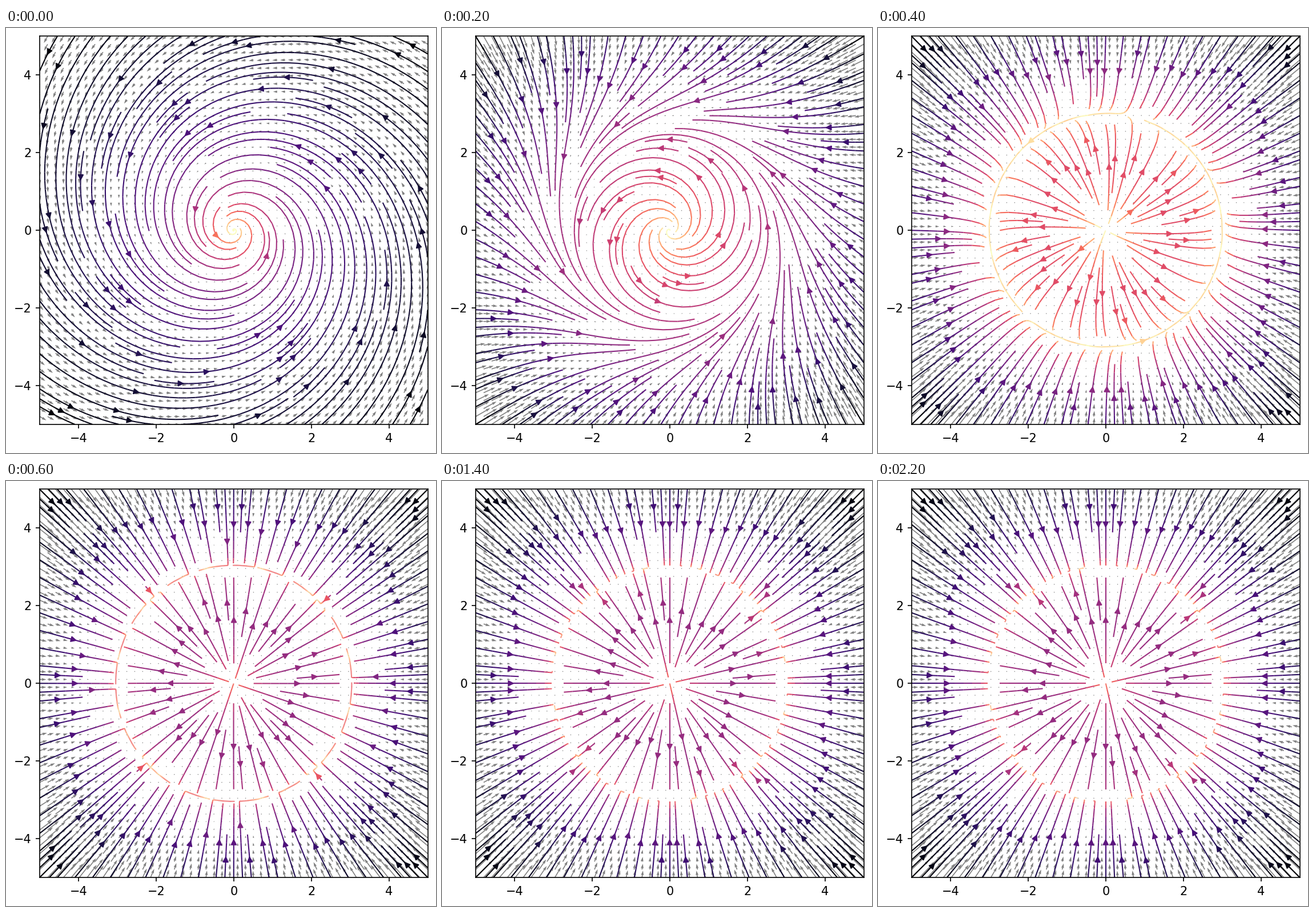
A matplotlib script that plays this animation: 753x744 px, repeating every 2400 ms.

```python
import math

import matplotlib.pyplot as plt
import numpy as np
from matplotlib.animation import FuncAnimation
from matplotlib.collections import LineCollection
from matplotlib.colors import Normalize
from matplotlib.patches import FancyArrowPatch

WIDTH, HEIGHT, DPI = 753, 744, 150
FRAMES, INTERVAL = 24, 100
EXTENT = 5.0
GRID = 50            # field samples per axis
CELLS = 45           # streamline spacing mask per axis
LAST = GRID - 1
TO_MASK = (CELLS - 1) / LAST
MAX_STEP, MAX_ERROR = 1 / CELLS, 0.003
MIN_LENGTH, MAX_LENGTH = 0.1, 2.0
CMAP = plt.get_cmap("magma_r")

axis = np.linspace(-EXTENT, EXTENT, GRID)
X, Y = np.meshgrid(axis, axis)


def field(frame):
    """Inward spiral that relaxes geometrically to a radial limit circle."""
    spiral = 0.2 ** frame
    radial = (1 - spiral) * 0.004 * (9.22 - X**2 - Y**2) - 0.3 * spiral
    return radial * X - spiral * Y, radial * Y + spiral * X


def spiral_cells():
    """Mask cells from the border inwards, counter-clockwise."""
    x0, y0, x1, y1 = 0, 1, CELLS - 1, CELLS - 1
    x = y = 0
    heading = "right"
    for _ in range(CELLS * CELLS):
        yield x, y
        if heading == "right":
            x += 1
            if x >= x1:
                x1 -= 1
                heading = "up"
        elif heading == "up":
            y += 1
            if y >= y1:
                y1 -= 1
                heading = "left"
        elif heading == "left":
            x -= 1
            if x <= x0:
                x0 += 1
                heading = "down"
        else:
            y -= 1
            if y <= y0:
                y0 += 1
                heading = "right"


def make_flow(u, v):
    """Bilinear unit-speed flow in grid coordinates; None outside the grid."""
    speed = np.hypot(u, v)
    us, vs, ss = u.tolist(), v.tolist(), speed.tolist()

    def mix(rows, i, j, a, b):
        low, high = rows[j], rows[j + 1]
        bottom = low[i] + (low[i + 1] - low[i]) * a
        top = high[i] + (high[i + 1] - high[i]) * a
        return bottom + (top - bottom) * b

    def flow(x, y):
        if not (0 <= x <= LAST and 0 <= y <= LAST):
            return None
        i, j = min(int(x), LAST - 1), min(int(y), LAST - 1)
        a, b = x - i, y - j
        scale = LAST / max(mix(ss, i, j, a, b), 1e-300)
        return mix(us, i, j, a, b) * scale, mix(vs, i, j, a, b) * scale

    return flow


class Mask:
    def __init__(self):
        self.used = [[False] * CELLS for _ in range(CELLS)]
        self.path, self.current = [], None

    @staticmethod
    def cell(x, y):
        return round(x * TO_MASK), round(y * TO_MASK)

    def start(self, x, y):
        self.path, self.current = [], None
        self.enter(x, y)

    def enter(self, x, y):
        cell = self.cell(x, y)
        if cell == self.current:
            return True
        cx, cy = cell
        if self.used[cy][cx]:
            return False
        self.used[cy][cx] = True
        self.path.append(cell)
        self.current = cell
        return True

    def undo(self):
        for cx, cy in self.path:
            self.used[cy][cx] = False


def to_border(x, y, kx, ky):
    def reach(p, k):
        if k == 0:
            return math.inf
        return p / -k if k < 0 else (LAST - p) / k

    step = min(reach(x, kx), reach(y, ky))
    return step, (x + kx * step, y + ky * step)


def trace(x, y, flow, sign, mask):
    """Adaptive Heun integration; returns travelled length and points."""
    points, total, step = [], 0.0, MAX_STEP
    accepted, anchor = 0, (x, y)
    tiny = 0.0005 * LAST
    while True:
        k1 = flow(x, y)
        if k1 is None:
            break
        if not points or math.hypot(x - points[-1][0], y - points[-1][1]) > tiny:
            points.append((x, y))
        k1x, k1y = sign * k1[0], sign * k1[1]
        k2 = flow(x + step * k1x, y + step * k1y)
        if k2 is None:
            extra, end = to_border(x, y, k1x, k1y)
            points.append(end)
            total += extra
            break
        k2x, k2y = sign * k2[0], sign * k2[1]
        error = 0.5 * step * math.hypot(k2x - k1x, k2y - k1y) / LAST
        if error < MAX_ERROR:
            x += 0.5 * step * (k1x + k2x)
            y += 0.5 * step * (k1y + k2y)
            if not (0 <= x <= LAST and 0 <= y <= LAST) or not mask.enter(x, y):
                break
            if total + step > MAX_LENGTH:
                break
            total += step
            accepted += 1
            if accepted % 64 == 0:
                # a line caught on the limit circle only jitters in place
                if math.hypot(x - anchor[0], y - anchor[1]) < 1e-4 * LAST:
                    total = MAX_LENGTH
                    break
                anchor = (x, y)
        if error == 0:
            step = MAX_STEP
        else:
            step = min(MAX_STEP, 0.85 * step * math.sqrt(MAX_ERROR / error))
    return total, points


def streamlines(u, v):
    flow, mask, lines = make_flow(u, v), Mask(), []
    for cx, cy in spiral_cells():
        if mask.used[cy][cx]:
            continue
        x, y = min(cx / TO_MASK, LAST), min(cy / TO_MASK, LAST)
        mask.start(x, y)
        back, before = trace(x, y, flow, -1, mask)
        mask.current = mask.cell(x, y)
        ahead, after = trace(x, y, flow, 1, mask)
        line = before[::-1] + after[1:]
        if back + ahead > MIN_LENGTH and len(line) > 1:
            lines.append(np.array(line))
        else:
            mask.undo()
    return lines


def sample(values, points):
    x, y = np.clip(points, 0, LAST).T
    i = np.minimum(x.astype(int), LAST - 1)
    j = np.minimum(y.astype(int), LAST - 1)
    a, b = x - i, y - j
    bottom = values[j, i] * (1 - a) + values[j, i + 1] * a
    top = values[j + 1, i] * (1 - a) + values[j + 1, i + 1] * a
    return bottom * (1 - b) + top * b


# the margin keeps the pixel size from rounding down
fig = plt.figure(figsize=((WIDTH + 0.01) / DPI, (HEIGHT + 0.01) / DPI), dpi=DPI,
                 facecolor="white")
ax = fig.add_axes([59 / WIDTH, 50 / HEIGHT, 679.5 / WIDTH, 679.5 / HEIGHT])
ax.set(xlim=(-EXTENT, EXTENT), ylim=(-EXTENT, EXTENT),
       xticks=range(-4, 5, 2), yticks=range(-4, 5, 2))
ax.set_autoscale_on(False)

quiver = ax.quiver(X, Y, X, Y, color="gray", scale=1.8 * GRID)
strokes = LineCollection([], cmap=CMAP, linewidths=1, zorder=2)
ax.add_collection(strokes, autolim=False)
heads = []
portraits = {}


def portrait(step):
    """Segments, colour values and arrow placements of one flow state."""
    if step not in portraits:
        u, v = field(step)
        shade = np.log(np.hypot(u, v))
        segments, colors, arrows = [], [], []
        for line in streamlines(u, v):
            xy = line * (2 * EXTENT / LAST) - EXTENT
            value = sample(shade, line)[:-1]
            segments.append(np.stack([xy[:-1], xy[1:]], axis=1))
            colors.append(value)
            run = np.cumsum(np.hypot(*np.diff(xy, axis=0).T))
            mid = min(np.searchsorted(run, run[-1] / 2), len(value) - 1)
            arrows.append((xy[mid], xy[mid:mid + 2].mean(axis=0), value[mid]))
        portraits[step] = (u, v, Normalize(shade.min(), shade.max()),
                           np.concatenate(segments), np.concatenate(colors), arrows)
    return portraits[step]


def draw(frame):
    # the flow has settled from here on
    u, v, norm, segments, colors, arrows = portrait(min(frame, 14))
    mean = np.hypot(u, v).mean()
    quiver.set_UVC(u / mean, v / mean)
    strokes.set_segments(segments)
    strokes.set_array(colors)
    strokes.set_norm(norm)
    while heads:
        heads.pop().remove()
    for tail, tip, value in arrows:
        head = FancyArrowPatch(tail, tip, arrowstyle="-|>", mutation_scale=10,
                               linewidth=1, color=CMAP(norm(value)), zorder=2)
        heads.append(ax.add_patch(head))
    return [quiver, strokes, *heads]


animation = FuncAnimation(fig, draw, frames=FRAMES, interval=INTERVAL,
                          init_func=lambda: [], repeat=True, repeat_delay=0)
plt.show()
```
